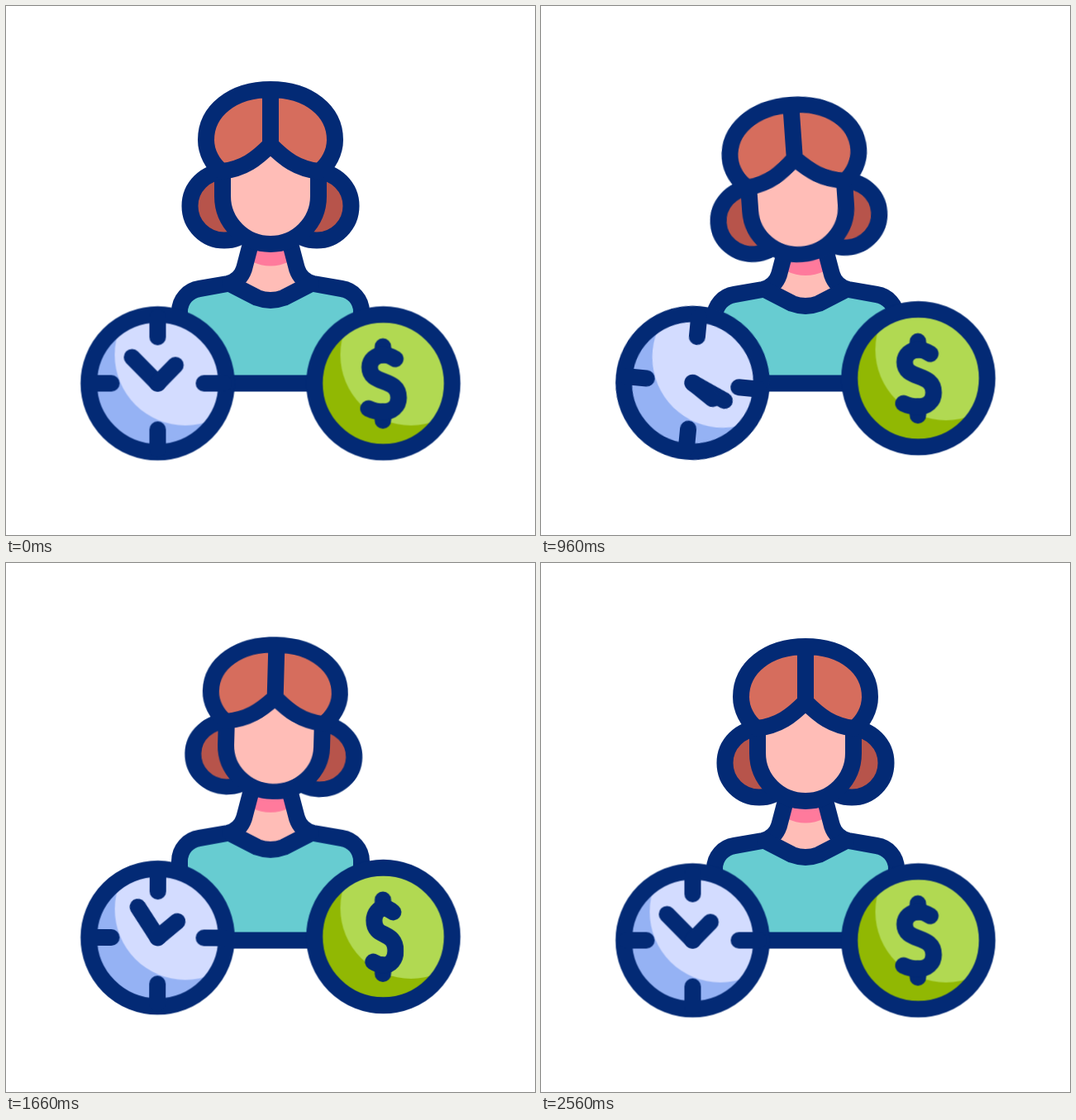
Recreate the animation shown at these times as an HTML page without scripts. Size 640 by 640 pixels, loop 2840 ms.

```html
<!DOCTYPE html>
<html lang="en">
<head>
<meta charset="utf-8">
<title>Time and money</title>
<style>
  html, body { margin: 0; width: 100%; height: 100%; overflow: hidden; background: #fff; }
  svg { display: block; width: 640px; height: 640px; }

  .line { fill: none; stroke: #032a75; stroke-width: 20; stroke-linecap: round; stroke-linejoin: round; }
  .skin { fill: #ffbdb7; }
  .shade { fill: #ff7a9c; }
  .shirt { fill: #67ccd1; }
  .hair { fill: #d66d5d; }
  .bun { fill: #b7544b; }
  .clock { --dark: #95b2f4; --light: #d3dcff; }
  .coin { --dark: #91b803; --light: #b1d952; }
  .base { fill: var(--dark); }
  .glow { fill: var(--light); }

  .body, .tilt, .head, .clock, .coin, .wobble, .hand, .flip {
    animation: 2840ms cubic-bezier(.37, 0, .63, 1) infinite;
  }
  .body { animation-name: body; }
  .tilt { animation-name: tilt; transform-origin: 320px 370px; }
  .head { animation-name: head; transform-origin: 320px 288px; }
  .clock { animation-name: clock; }
  .coin { animation-name: coin; }
  .wobble { animation-name: wobble; }
  .hand { animation-name: spin; }
  .hour { --turns: 1; }
  .minute { --turns: 2; }
  .flip { animation-name: flip; transform-origin: 4px 0; vector-effect: non-scaling-stroke; }

  @keyframes body {
    0%, 7.04%, 90.1%, 100% { transform: translateY(0); }
    16.2% { transform: translateY(-8px); }
    26.76%, 40.85% { transform: translateY(6px); }
    33.8% { transform: translateY(7px); }
    50.7% { transform: translateY(-12px); }
    79.2% { transform: translateY(4.4px); }
  }
  @keyframes head {
    0%, 7.04%, 90.1%, 100% { transform: translateY(0) scaleY(1); }
    16.2% { transform: translateY(-12px) scaleY(.975); }
    26.76%, 40.85% { transform: translateY(11.3px) scaleY(.97); }
    33.8% { transform: translateY(12.3px) scaleY(.97); }
    50.7% { transform: translateY(-16px) scaleY(.94); }
    79.2% { transform: translateY(10.4px) scaleY(1); }
  }
  @keyframes tilt {
    0%, 7.04%, 90.1%, 100% { transform: rotate(0); }
    35.9% { transform: rotate(-4.1deg); }
    71.8% { transform: rotate(4deg); }
  }
  @keyframes clock {
    0%, 7.04%, 90.1%, 100% { transform: translateY(0); }
    16.2% { transform: translateY(-5px); }
    26.76%, 40.85% { transform: translateY(-.6px); }
    45.4% { transform: translateY(3px); }
    50.7% { transform: translateY(-5px); }
    76.76% { transform: translateY(3.7px); }
  }
  @keyframes coin {
    0%, 14%, 90.1%, 100% { transform: translateY(0); }
    26.76% { transform: translateY(-12px); }
    40.85% { transform: translateY(-.5px); }
    45.4% { transform: translateY(7px); }
    50.7% { transform: translateY(-7.5px); }
    76.76% { transform: translateY(7px); }
  }
  @keyframes wobble {
    0%, 24.6%, 59.86%, 100% { transform: rotate(0); }
    32.75% { transform: rotate(6deg); }
    41.2% { transform: rotate(-6deg); }
    50% { transform: rotate(5.2deg); }
  }
  @keyframes spin {
    0%, 24% { transform: rotate(0); }
    55.8% { transform: rotate(calc(var(--turns) * 366deg)); }
    75.35%, 100% { transform: rotate(calc(var(--turns) * 360deg)); }
  }
  @keyframes flip {
    0%, 53.7% { transform: scaleX(1); animation-timing-function: ease-in; }
    64.44% { transform: scaleX(0); animation-timing-function: ease-out; }
    69.8% { transform: scaleX(-1); animation-timing-function: ease-in; }
    75.2% { transform: scaleX(0); animation-timing-function: ease-out; }
    85.9%, 100% { transform: scaleX(1); }
  }
</style>
</head>
<body>
<svg viewBox="0 0 640 640">
  <defs>
    <clipPath id="rim"><circle r="83"/></clipPath>
    <g id="disc">
      <circle class="base" r="83"/>
      <circle class="glow" cx="33.5" cy="-34.5" r="85.5" clip-path="url(#rim)"/>
      <circle class="line" r="83.3"/>
    </g>
  </defs>

  <g class="body">
    <path class="shirt" d="M210 458V370C210 355 221 344 234 342L271 336L304 353Q320 359 336 353L369 336L406 342C419 344 430 355 430 370V458Z"/>
    <path class="skin" d="M297 255L288 318Q283 333 271 336L304 353Q320 359 336 353L369 336Q357 333 352 318L343 255Z"/>
  </g>
  <path class="shade head" d="M297 265V309Q320 320 343 309V265Z"/>
  <g class="body line">
    <path d="M210 458V370C210 355 221 344 234 342L268 336Q283 333 288 318L298 280"/>
    <path d="M430 458V370C430 355 419 344 406 342L372 336Q357 333 352 318L342 280"/>
    <path d="M271 336L304 353Q320 359 336 353L369 336"/>
  </g>
  <path class="line" d="M183 456.5H457"/>

  <g class="tilt">
    <g class="head">
      <g class="bun">
        <circle cx="264" cy="242" r="41.5"/>
        <circle cx="376" cy="242" r="41.5"/>
      </g>
      <g class="line">
        <circle cx="264" cy="242" r="41.5"/>
        <circle cx="376" cy="242" r="41.5"/>
      </g>
      <path class="skin" d="M262 195V230a58 58 0 0 0 116 0V195L320 150Z"/>
      <path class="line" d="M262 200V230a58 58 0 0 0 116 0V200"/>
      <path id="top" class="hair" d="M320 101C274 101 242 127 242 162C242 177 250 192 261 200C288 197 303 185 320 168C337 185 352 197 379 200C390 192 398 177 398 162C398 127 366 101 320 101Z"/>
      <path class="line" d="M320 168V101C274 101 242 127 242 162C242 177 250 192 261 200C288 197 303 185 320 168C337 185 352 197 379 200C390 192 398 177 398 162C398 127 366 101 320 101"/>
    </g>
  </g>

  <g transform="translate(183.5 456.5)">
    <g class="clock">
      <g class="wobble">
        <use href="#disc"/>
        <path class="line" d="M0-80V-56M0 80V56M-80 0H-56M80 0H56"/>
        <path class="line hand minute" d="M0 0L-31-31.5"/>
        <path class="line hand hour" d="M0 0L21.5-22"/>
      </g>
    </g>
  </g>

  <g transform="translate(456.5 456.5)">
    <g class="coin">
      <use href="#disc"/>
      <path class="line" d="M-.5-34.5V-44.5M-.5 34.5V45"/>
      <path class="line flip" d="M14.5-29.5C9-33 3-34.5 0-34.5C-9-34.5-16.5-28-16.5-19.5C-16.5 3 18.5-8 18.5 17.5C18.5 28 10 34.5 0 34.5C-6 34.5-13 33-18 30.5"/>
    </g>
  </g>
</svg>
</body>
</html>
```
